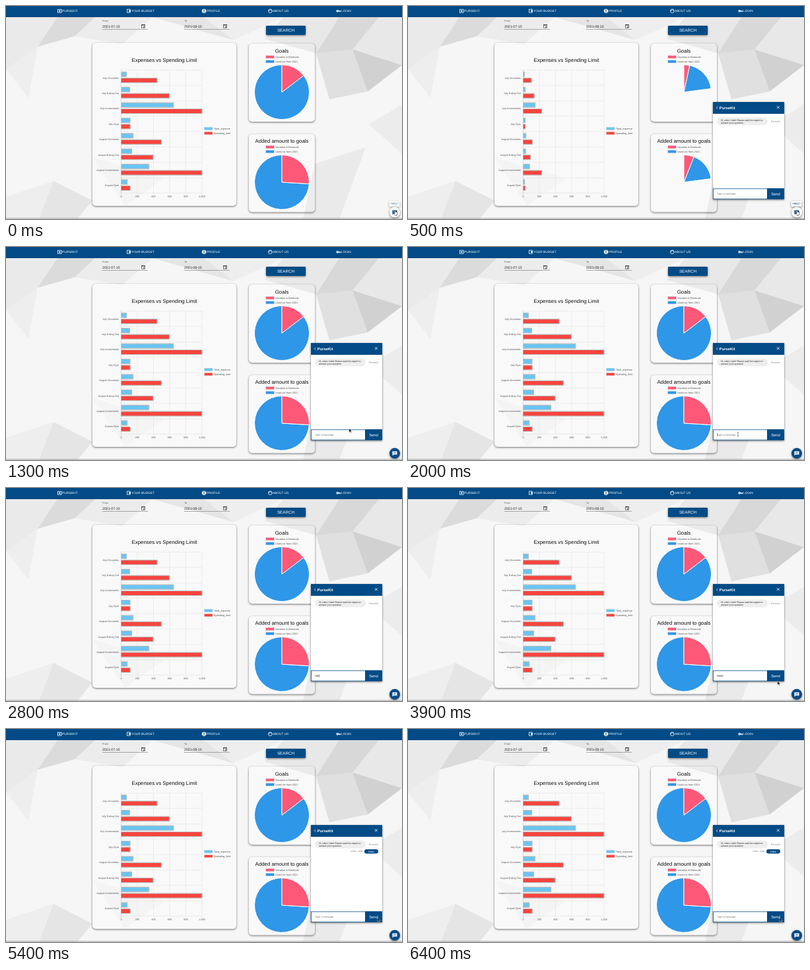
An HTML page that plays this animation: 600x324 px, repeating every 6.5 s.

```html
<!DOCTYPE html>
<html lang="en">
<head>
<meta charset="utf-8">
<title>Budget dashboard</title>
<style>
html, body { margin: 0; width: 100%; height: 100%; overflow: hidden; background: #f6f6f6; }
svg { display: block; width: 600px; height: 324px; font-family: "Liberation Sans", Arial, sans-serif; text-rendering: geometricPrecision; }
.card { filter: drop-shadow(0 1.5px 1.5px rgba(0,0,0,.55)); }
</style>
</head>
<body>
<svg id="stage" viewBox="0 0 600 324"></svg>
<script>
const NAVY = '#034b86', RED = '#f6443e', SKY = '#69c5f2', PINK = '#fd5878', BLUE = '#2e97e8';
const BRAND = 'PurseKit', USER = 'robin, hale';
const stage = document.getElementById('stage');

function add(tag, attrs, parent = stage) {
  const el = document.createElementNS('http://www.w3.org/2000/svg', tag);
  for (const k in attrs) el.setAttribute(k, attrs[k]);
  return parent.appendChild(el);
}
const rect = (x, y, width, height, fill, more = {}, parent) =>
  add('rect', { x, y, width, height, fill, ...more }, parent);
const path = (d, more = {}, parent) => add('path', { d, fill: 'none', ...more }, parent);
const group = () => add('g', {});
function text(str, x, y, size, fill = '#222', more = {}, parent) {
  const el = add('text', { x, y, 'font-size': size, fill, ...more }, parent);
  el.textContent = str;
  return el;
}
const MID = { 'text-anchor': 'middle' }, END = { 'text-anchor': 'end' }, BOLD = { 'font-weight': 700 };
const show = (el, on) => el.setAttribute('visibility', on ? 'visible' : 'hidden');

// Page and cards
rect(0, 0, 600, 324, '#f6f6f6');
const card = (x, y, w, h) => rect(x, y, w, h, '#f9f9f9', { rx: 5, class: 'card' });
card(131, 56, 218, 248);
card(368, 57, 100, 119);
card(368, 195, 100, 118.5);

// Faceted backdrop
[
  ['0,17 78,17 48,62 0,96', .05],
  ['78,17 135,17 104,46 48,62', .11],
  ['135,17 222,17 176,58 104,46', .04],
  ['222,17 300,17 345,52', .07],
  ['300,17 420,17 345,52', .03],
  ['420,17 505,17 470,72 392,50', .06],
  ['505,17 565,17 525,66 470,72', .12],
  ['565,17 600,17 600,90 525,66', .06],
  ['470,72 525,66 548,130 490,142', .09],
  ['525,66 600,90 548,130', .15],
  ['0,96 48,62 34,140', .03],
  ['600,150 600,225 550,180', .04],
  ['0,290 72,266 50,324 0,324', .03],
  ['72,266 131,296 108,324 50,324', .07],
  ['468,240 545,215 505,324 450,324', .05],
  ['131,230 240,262 180,304', .02]
].forEach(([points, opacity]) => add('polygon', { points, opacity, fill: '#000' }));
rect(0, 322.5, 600, 1, '#a5a5a5');

// Navigation
rect(0, 0, 600, 17, NAVY);
[[85, BRAND.toUpperCase()], [190, 'YOUR BUDGET'], [304, 'PROFILE'], [404, 'ABOUT US'], [508, 'LOGIN']]
  .forEach(([x, label]) => text(label, x, 9.4, 4.75, '#fff'));
const white = { stroke: '#fff', 'stroke-width': .8 };
rect(78.5, 5.2, 5.5, 4.8, 'none', white);
rect(80.4, 6.4, 1.7, 2.4, '#fff');
rect(183.6, 5, 4.6, 5, 'none', white);
rect(186, 6.4, 3, 2.2, '#fff');
add('circle', { cx: 300, cy: 7.6, r: 3.2, fill: '#fff' });
add('circle', { cx: 300, cy: 6.6, r: 1, fill: NAVY });
path('M298.2 9.3q1.8-1.5 3.6 0', { stroke: NAVY, 'stroke-width': .8 });
add('circle', { cx: 400.3, cy: 7.6, r: 2.8, fill: 'none', ...white });
path('M397.6 7Q400 7 401 5.2 401.5 6.7 403 6.8', white);
add('circle', { cx: 502.3, cy: 7.6, r: 1.3, fill: 'none', stroke: '#fff', 'stroke-width': 1.2 });
path('M503.6 7.6H507.2M506 7.6V9.2', { stroke: '#fff', 'stroke-width': 1.1 });

// Date fields and search
[[146, 'From', '2021-07-15'], [270, 'To', '2021-08-15']].forEach(([x, label, date]) => {
  text(label, x, 24.2, 4, '#666');
  text(date, x, 32.8, 5.2);
  rect(x, 35.2, 69, .6, '#777');
  rect(x + 59.6, 28.4, 4.8, 4.8, 'none', { stroke: '#444', 'stroke-width': .7 });
  rect(x + 59.3, 28, 5.4, 1.5, '#444');
  rect(x + 62, 31, 1.6, 1.5, '#444');
});
rect(394, 30, 60, 14, NAVY, { rx: 1.2, class: 'card' });
text('SEARCH', 424, 39.2, 6.3, '#fff', MID);

// Bar chart
const X0 = 174.5, UNIT = .1225, TOP = 97.5, ROW = 23.4;
text('Expenses vs Spending Limit', 240, 85, 7.88, '#111', MID);
for (let i = 0; i <= 5; i++) {
  const x = X0 + i * 200 * UNIT;
  rect(x - .25, TOP, .5, ROW * 8 + 2.5, i ? '#dedede' : '#bbb');
  text((i * 200).toLocaleString('en-US'), x, 291, 3.85, '#555', MID);
}
for (let i = 0; i <= 8; i++) rect(X0 - 2.5, TOP + i * ROW - .25, 125, .5, '#dedede');

const spent = [65, 105, 648, 110, 147, 130, 343, 75];
const limits = [445, 596, 1000, 112, 497, 396, 1000, 112];
const kinds = ['Groceries', 'Eating Out', 'Investments', 'Gym'];
const bars = [];
for (let i = 0; i < 8; i++) {
  const y = TOP + i * ROW;
  text((i < 4 ? 'July ' : 'August ') + kinds[i % 4], 171, y + ROW / 2 + 1.3, 3.85, '#555', END);
  [[spent[i], SKY, 2.8], [limits[i], RED, 12.2]].forEach(([value, color, dy]) =>
    bars.push({ value, y: y + dy, el: path('', { fill: color, stroke: '#bcbcbc', 'stroke-width': 1.2 }) }));
}
function legend(x, y, color, label) {
  rect(x, y, 12.5, 4.2, color, { stroke: '#ccc', 'stroke-width': .4 });
  text(label, x + 14.5, y + 3.5, 3.85, '#555');
}
legend(300.5, 184.4, SKY, 'Total_expense');
legend(300.5, 191.4, RED, 'Spending_limit');

// Pie charts
const pies = [['Goals', 71, 131, .146], ['Added amount to goals', 208, 268, .26]].map(([title, base, cy, share]) => {
  text(title, 418, base, 7.88, '#111', MID);
  legend(393.8, base + 4.4, PINK, 'Vacation in Bermuda');
  legend(393.8, base + 11.4, BLUE, 'Used car from 2021');
  const slice = fill => path('', { fill, stroke: '#fff', 'stroke-width': 1 });
  return { cy, share, blue: slice(BLUE), pink: slice(PINK) };
});
function wedge(cy, from, to) {
  const at = f => `${418 + 41.5 * Math.sin(f * 2 * Math.PI)} ${cy - 41.5 * Math.cos(f * 2 * Math.PI)}`;
  return `M418 ${cy}L${at(from)}A41.5 41.5 0 ${+(to - from > .5)} 1 ${at(Math.min(to, .99999))}Z`;
}
function drawCharts(p) {
  for (const b of bars) b.el.setAttribute('d', `M${X0} ${b.y}h${b.value * UNIT * p}v7h${-b.value * UNIT * p}`);
  for (const { cy, share, blue, pink } of pies) {
    pink.setAttribute('d', wedge(cy, 0, share * p));
    blue.setAttribute('d', wedge(cy, share * p, p));
  }
}

// Chat window
const chat = group();
rect(462, 146, 108, 148, '#fff', { class: 'card' }, chat);
rect(462, 146, 108, 18, NAVY, {}, chat);
path('M469 152.8l-1.5 1.9 1.5 1.9', { stroke: '#fff', 'stroke-width': .7 }, chat);
text(BRAND, 471.8, 156.8, 5.8, '#fff', BOLD, chat);
path('M558.8 152.2l4 4m0-4l-4 4', white, chat);
rect(468, 169.5, 77, 12, '#eee', { rx: 6 }, chat);
text(`Hi, ${USER}! Please wait the expert to`, 474, 174.8, 3.6, '#222', {}, chat);
text('answer your question', 474, 179.2, 3.6, '#222', {}, chat);
text(BRAND, 564, 177, 3.8, '#888', END, chat);
rect(462.4, 277.9, 107.2, 15.7, '#fff', { stroke: NAVY, 'stroke-width': .8 }, chat);
rect(544, 277.5, 26, 16.5, NAVY, {}, chat);
text('Send', 557, 288, 5.8, '#fff', MID, chat);
const input = text('', 468, 287, 3.85, '#777', {}, chat);
const caret = rect(468, 283.4, .5, 4.4, '#222', {}, chat);

const reply = group();
text(USER, 540, 187.4, 3.8, '#888', END, reply);
rect(543, 182.9, 21, 6.6, NAVY, { rx: 3.3 }, reply);
text('Hello!', 553.5, 187.5, 3.8, '#fff', MID, reply);

// Help button
const tip = group();
rect(580.5, 296.8, 16, 8.4, '#fff', { rx: 1, class: 'card' }, tip);
text('Help?', 588.5, 302.4, 4.7, NAVY, MID, tip);
const disc = add('circle', { cx: 589, cy: 313.8, r: 8, class: 'card' });
const bubble = path('M585.5 310.8h7v5h-5.2l-1.8 1.8z');
const dots = path('M587 312.4h4m-4 1.7h4', { 'stroke-width': .6 });

// Pointers
const hand = path('M589 313v-2q.7-1 1.4 0v2.2l2.6.6v2.6l-1 2h-2.6l-2-2.7q.6-.9 1.6 0z', { fill: '#fff', stroke: '#111', 'stroke-width': .6 });
const arrow = path('M0 0v6l1.4-1.2 1 2.2 1-.5-1-2.1h1.9z', { fill: '#111', stroke: '#fff', 'stroke-width': .4 });
const ibeam = path('M-1-2.5h2m-1 0v5m-1 0h2', { stroke: '#222', 'stroke-width': .5 });
// time, x, y
const track = [[900, 588, 312], [1300, 519.8, 276], [1600, 500, 285], [3400, 500, 285],
  [3900, 559.8, 293.5], [4300, 563, 287], [6500, 563, 287]];
function pointerAt(t) {
  const i = Math.max(1, track.findIndex(k => k[0] > t));
  const [t0, x0, y0] = track[i - 1], [t1, x1, y1] = track[i];
  const u = Math.max(0, (t - t0) / (t1 - t0));
  return [x0 + (x1 - x0) * u, y0 + (y1 - y0) * u];
}

const keyTimes = [2500, 2600, 2800, 2900, 3000, 3200];
const SENT = 4500;

function draw(t) {
  const open = t >= 500, hover = t < 1000, sent = t >= SENT;
  drawCharts(open ? 1 - (1 - Math.min(1, (t - 437) / 1000)) ** 4 : 1);
  show(chat, open);
  show(reply, sent);

  const typed = sent ? '' : 'Hello!'.slice(0, keyTimes.filter(k => t >= k).length);
  input.textContent = typed || 'Type a message.';
  input.setAttribute('fill', typed ? '#111' : '#777');
  caret.setAttribute('x', 468.2 + (typed ? input.getComputedTextLength() : 0));
  show(caret, t >= 1800 && t < 3400 && (t >= 2500 || t % 1000 < 500));

  show(tip, hover);
  tip.setAttribute('opacity', Math.min(1, .65 + t / 570));
  disc.setAttribute('fill', hover ? '#fff' : NAVY);
  bubble.setAttribute('fill', hover ? NAVY : '#fff');
  dots.setAttribute('stroke', hover ? '#fff' : NAVY);

  const [x, y] = pointerAt(t);
  const overInput = t >= 1500 && t < 2500 || t >= 3400 && t < 3600;
  show(hand, hover);
  show(ibeam, overInput);
  show(arrow, !hover && !overInput && (t < 1500 || t >= 3600));
  for (const el of [arrow, ibeam]) el.setAttribute('transform', `translate(${x} ${y})`);
}

const start = performance.now();
function tick() {
  const t = (performance.now() - start) % 6500;
  draw(Math.floor(t / 100) * 100);
  requestAnimationFrame(tick);
}
tick();
</script>
</body>
</html>
```
